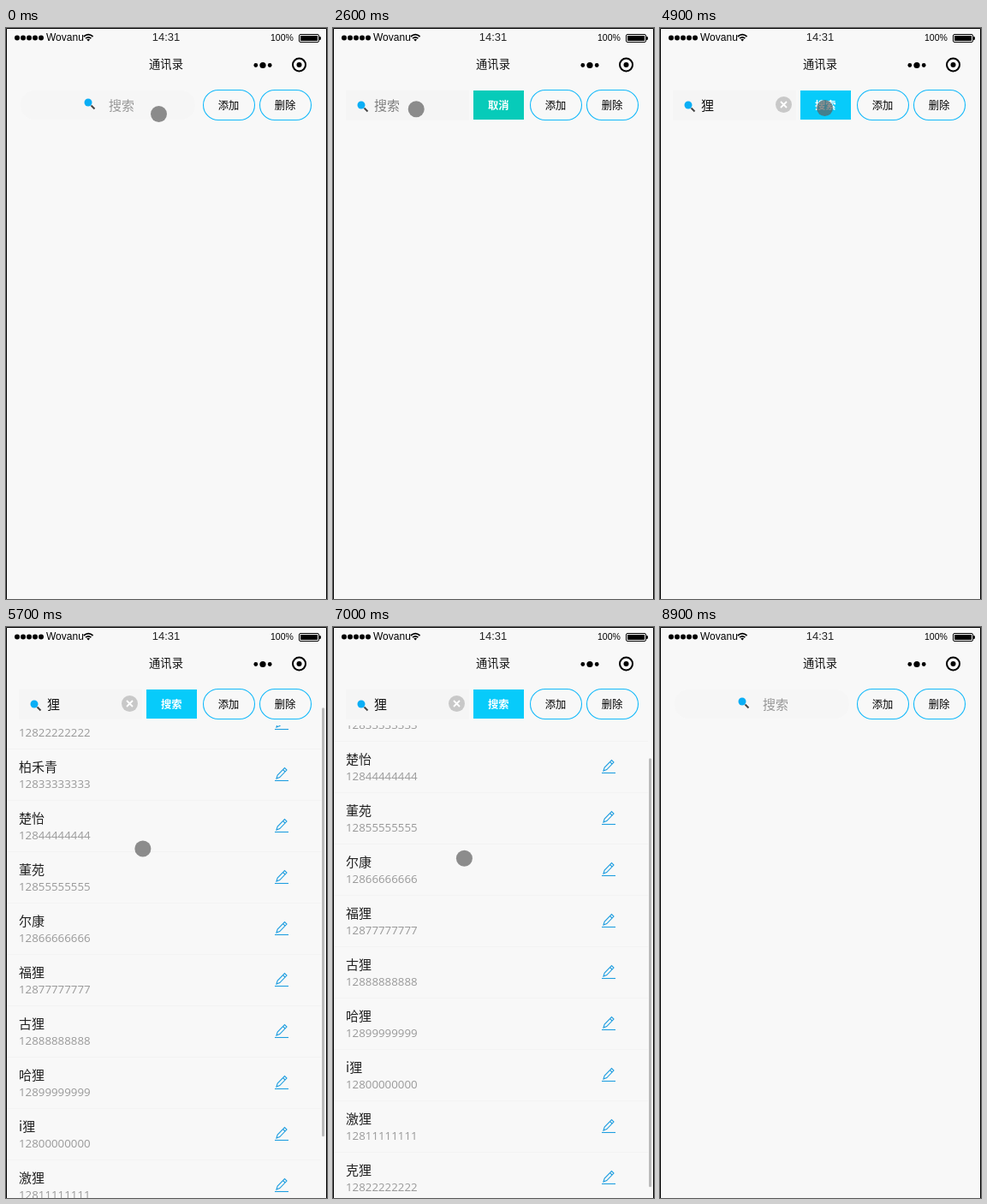
Write an HTML page that moves like this. It is 375 px wide and 667 px high and loops after 9400 ms.

```html
<!DOCTYPE html>
<html lang="zh-CN">
<head>
<meta charset="utf-8">
<title>通讯录</title>
<style>
  html, body { margin: 0; width: 100%; height: 100%; overflow: hidden; background: #f8f8f8; }
  svg { display: block; width: 375px; height: 667px; }
  text { font-family: "Noto Sans CJK SC", "Noto Sans CJK", sans-serif; white-space: pre; }
  .status { font-family: "Liberation Sans", Arial, sans-serif; }
  .phone { font-family: "Open Sans", sans-serif; font-size: 13.3px; fill: #999; }
  .candidate { font-family: "Liberation Serif", "Noto Serif CJK SC", "Noto Sans CJK SC", serif; font-size: 19px; }
  .mid { text-anchor: middle; }
</style>
</head>
<body>
<svg viewBox="0 0 375 667">
  <defs>
    <clipPath id="listArea"><rect x="1" y="115" width="373" height="552"/></clipPath>
    <g id="magnifier">
      <path d="M3.5 3.5L7.5 7.5" stroke="#444" stroke-width="2"/>
      <circle r="4.5" fill="#0aaef5"/>
    </g>
    <g id="pencil" fill="none" stroke="#1f9ee0" stroke-width="1.1">
      <path d="M2 13L3.2 9L11.5 .6L14 3.1L5.8 11.6ZM9.6 2.6L12 5"/>
      <path d="M0 15.5H16"/>
    </g>
  </defs>
  <rect width="375" height="667" fill="#f8f8f8"/>

  <g clip-path="url(#listArea)"><g id="list"></g></g>

  <g id="statusBar">
    <text class="status" x="47" y="15" font-size="12">Wovanu</text>
    <text class="status mid" x="187" y="15" font-size="13" fill="#222">14:31</text>
    <text class="status" x="309" y="15" font-size="10.5">100%</text>
    <path d="M90.8 10Q96.2 5.4 101.6 10M93 12.2Q96.2 9.4 99.4 12.2" fill="none" stroke="#000" stroke-width="1.7"/>
    <path d="M94.3 13.4Q96.2 12 98.1 13.4L96.2 15.6Z"/>
    <rect x="342.5" y="7.5" width="23" height="9" rx="1.5" fill="none" stroke="#000"/>
    <rect x="344" y="9" width="20" height="6"/>
    <path d="M366 10h1q1 0 1 2t-1 2h-1z"/>
  </g>
  <text class="mid" x="187" y="47" font-size="13.3" fill="#111">通讯录</text>
  <circle cx="291.8" cy="43.5" r="2.4"/><circle cx="300" cy="43.5" r="3.6"/><circle cx="308.2" cy="43.5" r="2.4"/>
  <circle cx="342.5" cy="43" r="7.5" fill="none" stroke="#000" stroke-width="2"/>
  <circle cx="342.5" cy="43" r="3"/>

  <g fill="none" stroke="#14b9fa" stroke-width="1.1">
    <rect x="230.5" y="72.5" width="60" height="35" rx="17.5"/>
    <rect x="296.5" y="72.5" width="60" height="35" rx="17.5"/>
  </g>
  <text class="mid" x="260" y="94.7" font-size="12.3">添加</text>
  <text class="mid" x="326" y="94.7" font-size="12.3">删除</text>

  <g id="idleField">
    <rect x="17" y="73" width="204" height="34" rx="17" fill="#f6f6f6"/>
    <use href="#magnifier" x="96" y="87"/>
    <text x="120" y="96" font-size="15" fill="#999">搜索</text>
  </g>
  <g id="openField">
    <rect x="15" y="73" width="144" height="35" fill="#f5f5f5"/>
    <use href="#magnifier" x="33" y="90"/>
    <text id="query" x="48" y="96" font-size="15"></text>
    <rect id="caret" y="81" width="1" height="20"/>
    <g id="clear">
      <circle cx="144.5" cy="89.5" r="9.5" fill="#c8c8c8"/>
      <path d="M141 86l7 7m0 -7l-7 7" stroke="#fff" stroke-width="1.8"/>
    </g>
    <rect id="action" x="164" y="73" width="59" height="34"/>
    <text id="actionLabel" class="mid" x="193.3" y="94.7" font-size="12.3" font-weight="700" fill="#fff"></text>
  </g>

  <g id="ime" fill="#228ec8">
    <rect x="73.5" y="123.5" width="330" height="92" rx="13" fill="#eefbf1"/>
    <rect x="77" y="127" width="330" height="85" rx="10" fill="#ddf8e3" stroke="#fff" stroke-width="2"/>
    <rect x="78.5" y="128.5" width="330" height="82" rx="9" fill="none" stroke="#c9efd4"/>
    <text id="pinyin" x="90" y="156" font-size="17" font-weight="500"></text>
    <rect id="imeCaret" y="140" width="1.2" height="20"/>
    <g fill="none" stroke="#f3c8aa" stroke-width="1.8">
      <path d="M177 156A8.3 7.3 0 1 1 179 150V157.5H175"/>
      <path d="M170.2 145v1.8M168.2 149.2h2v5.4m-2 0h4.2"/>
    </g>
    <text x="185" y="155" font-size="15" font-weight="300">工具箱(分号)</text>
    <path d="M83 168.5H375" stroke="#b9dfce"/>
    <g id="candidates"></g>
    <path d="M334 181v13l-7 -6.5z" fill="#a5d5e4"/>
    <path d="M341 181v13l7 -6.5z"/>
    <rect x="354.5" y="181.5" width="14" height="13" rx="1" fill="#d2f0ee" stroke="#8cc5df"/>
    <path d="M357.5 186.5h8l-4 4z"/>
    <circle cx="376" cy="134" r="4" fill="#9aaba2"/>
  </g>

  <rect id="thumb" x="369" width="3" height="501" rx="1.5" fill="#bbb"/>
  <circle id="pointer" r="9.5" fill="#5e5e5e" fill-opacity=".7"/>
  <path d="M.5 667V.5H374.5V667" fill="none" stroke="#000"/>
</svg>
<script>
const LOOP = 9400, STEP = 100, ROW = 60, MAX_SCROLL = 107;
const $ = id => document.getElementById(id);
const set = (id, attrs) => { for (const k in attrs) $(id).setAttribute(k, attrs[k]); };
const show = (id, on) => { $(id).style.display = on ? '' : 'none'; };
const within = (t, a, b) => t >= a && t < b;
const ramp = (t, a, b) => Math.min(1, Math.max(0, (t - a) / (b - a)));
const smooth = p => p * p * (3 - 2 * p);
const accelerate = p => p * p;

// The pointer: each gesture starts where the previous one ended.
const home = { x: 178, y: 100 };
const clearButton = { x: 146, y: 88 }, actionButton = { x: 192, y: 93 };
const swipeUp = { start: 5455, end: 5900, from: { x: 160, y: 291 } };
const swipeDown = { start: 6910, end: 7300, from: { x: 153, y: 264 } };

const move = (start, end, to, ease = smooth) => ({ start, end, to, ease });
const swipe = ({ start, end, from }, dy) => move(start, end, { x: from.x - 2, y: from.y + dy }, accelerate);
const gestures = [
  move(0, 300, { x: 112, y: 98 }),
  move(400, 700, { x: 105, y: 117 }),
  move(900, 1300, { x: 94, y: 99 }),
  move(1400, 1900, clearButton),
  move(2200, 2700, { x: 91, y: 95 }),
  move(4300, 4900, actionButton),
  move(5200, swipeUp.start, swipeUp.from),
  swipe(swipeUp, -MAX_SCROLL),
  move(6100, 6500, swipeDown.from),
  swipe(swipeDown, MAX_SCROLL),
  move(7300, 7600, { x: 128, y: 137 }),
  move(7600, 7700, clearButton),
  move(8100, 8500, actionButton),
  move(8600, 8800, { x: 222, y: 152 })
];

function pointerAt(t) {
  let { x, y } = home;
  for (const { start, end, to, ease } of gestures) {
    const p = ease(ramp(t, start, end));
    x += (to.x - x) * p;
    y += (to.y - y) * p;
  }
  return { x, y };
}

function scrollAt(t) {
  const travelled = ({ start, end }) => accelerate(ramp(t, start, end));
  return MAX_SCROLL * (travelled(swipeUp) - travelled(swipeDown));
}

// The scroll thumb shows during a swipe and fades after it.
const thumbOpacity = t =>
  ramp(t, 5500, 5600) - ramp(t, 6100, 6500) + ramp(t, 6900, 7000) - ramp(t, 7300, 7700);

function queryAt(t) {
  if (within(t, 1000, 2300)) return '1'.repeat(Math.min(3, 1 + (t - 1000) / STEP));
  return within(t, 3800, 8100) ? '狸' : '';
}

function drawField(t) {
  const open = within(t, 500, 8700);
  show('idleField', !open);
  show('openField', open);

  const query = queryAt(t);
  const ready = query && !within(t, 3800, 4100);
  $('query').textContent = query || '搜索';
  set('query', { fill: query ? '#111' : '#808080' });
  show('clear', ready);
  set('action', { fill: ready ? '#07cbfa' : '#07cbb9' });
  $('actionLabel').textContent = ready ? '搜索' : '取消';

  set('caret', { x: 48 + Math.round(query === '狸' ? 15 : query.length * 8.6) });
  show('caret', within(t, 700, 1500) || within(t, 2900, 3300) || within(t, 3800, 4400));
}

function drawIme(t) {
  const pinyin = t < 3600 ? 'l' : 'li';
  const words = t < 3600 ? '了来啦两老' : '狸里离李理';
  set('ime', { opacity: t < 4100 ? ramp(t, 3200, 3400) - .3 * ramp(t, 3800, 4000) : 0 });
  $('pinyin').textContent = pinyin;
  set('imeCaret', { x: 90 + pinyin.length * 3.6 });
  [...$('candidates').children].forEach((el, i) => { el.textContent = `${i + 1}.${words[i]}`; });
}

function drawList(t) {
  const scroll = scrollAt(t);
  show('list', within(t, 5100, 8700));
  set('list', { transform: `translate(0 ${-Math.round(scroll)})` });
  set('thumb', { y: 66.6 + scroll * .855, opacity: thumbOpacity(t) });
}

function drawPointer(t) {
  const { x, y } = pointerAt(t);
  set('pointer', { cx: x + .5, cy: y + .5 });
  show('pointer', t < 8900);
}

const contacts = ['阿狸', '柏禾青', '楚怡', '董苑', '尔康', '福狸', '古狸', '哈狸', 'i狸', '激狸', '克狸'];

$('list').innerHTML = contacts.map((name, i) => `
  <g transform="translate(0 ${115 + i * ROW})">
    <text x="15" y="26.3" font-size="15" fill="#222">${name}</text>
    <text class="phone" x="15" y="45">128${String((i + 2) % 10).repeat(8)}</text>
    <use href="#pencil" x="314" y="21"/>
    <path d="M1 59.5H368" stroke="#f3f3f3"/>
  </g>`).join('');

for (let i = 0; i < 5; i++) {
  $('statusBar').insertAdjacentHTML('beforeend', `<circle cx="${13 + i * 7}" cy="11.5" r="3"/>`);
  $('candidates').insertAdjacentHTML('beforeend',
    `<text class="candidate" x="${90 + i * 47.3}" y="194"${i ? '' : ' fill="#e2455c"'}></text>`);
}

const startTime = performance.now();
function tick() {
  const elapsed = (performance.now() - startTime) % LOOP;
  const t = Math.floor(elapsed / STEP) * STEP;
  for (const draw of [drawField, drawIme, drawList, drawPointer]) draw(t);
  requestAnimationFrame(tick);
}
tick();
</script>
</body>
</html>
```
